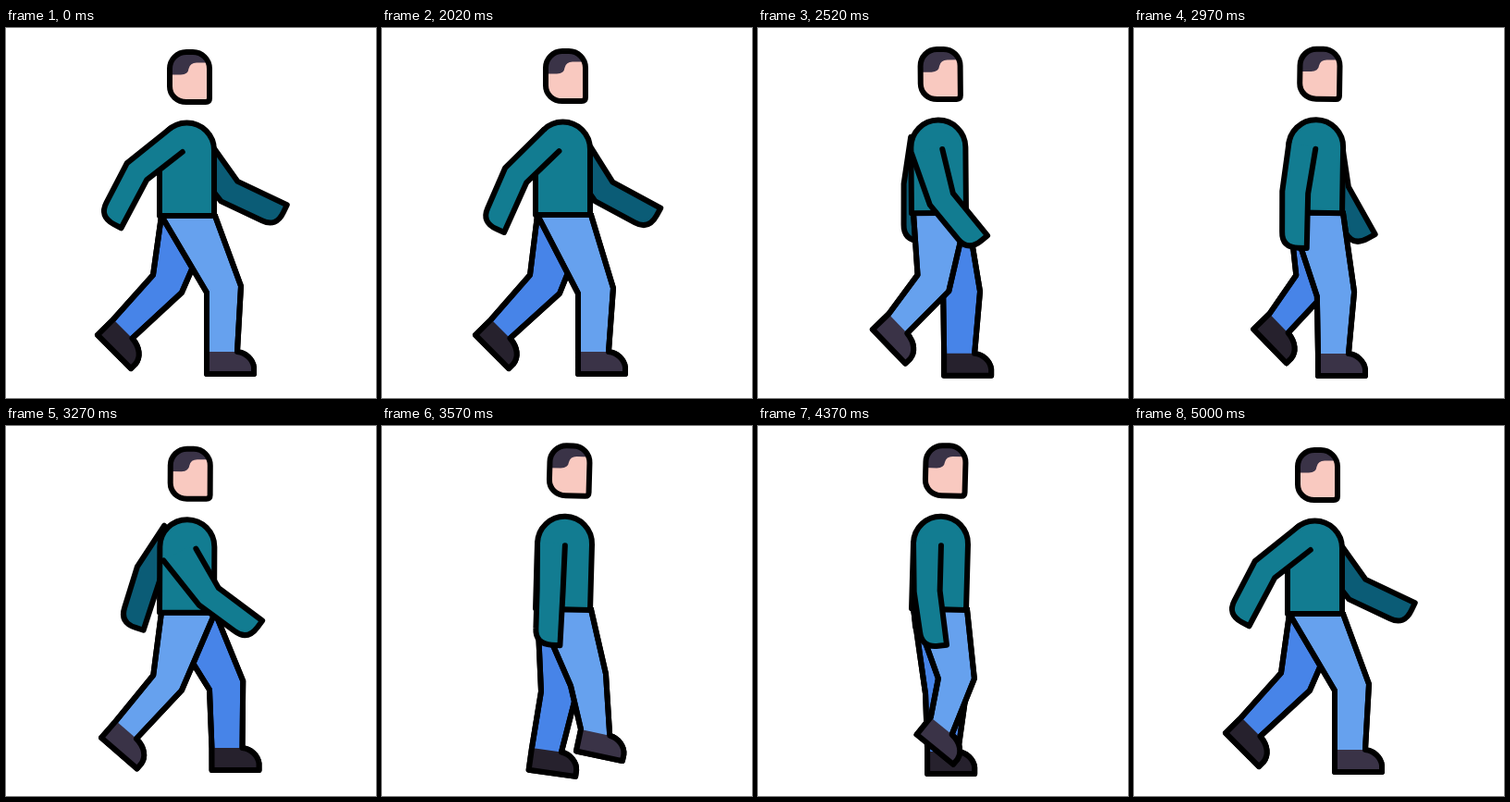
Recreate the animation shown at these times as an HTML page with a canvas. Size 400x400 px, loop 5020 ms.

```html
<!DOCTYPE html>
<html lang="en">
<head>
<meta charset="utf-8">
<title>Walking man</title>
<style>
html, body { margin: 0; width: 100%; height: 100%; overflow: hidden; background: #fff; }
canvas { display: block; width: 400px; height: 400px; }
</style>
</head>
<body>
<canvas id="stage"></canvas>
<script>
const LOOP = 5020, STEP = 17.5, LAST = 120;
const canvas = document.getElementById('stage');
const ctx = canvas.getContext('2d');
const dpr = window.devicePixelRatio || 1;
canvas.width = canvas.height = 400 * dpr;

// One walk cycle spans phase 0..2; each key starts with its phase.
// knee back x,y, knee front x,y, ankle back x,y, foot angle
const LEG = [
  [0, 217, 286, 254, 279, 217, 350, 0],
  [.057, 212, 287, 250, 281, 212, 350, 0],
  [.215, 199, 290, 239, 285, 200, 352, 0],
  [.43, 181, 290, 225, 288, 183, 352, 0],
  [.6, 172, 287, 210, 290, 162, 348, 8],
  [1, 159, 267, 190, 286, 116, 315, 45],
  [1.057, 160, 267, 192, 287, 118, 315, 45],
  [1.215, 174, 267, 208, 284, 144, 309, 46],
  [1.43, 195, 273, 234, 273, 187, 315, 39],
  [1.6, 204, 281, 242, 268, 215, 328, 12]
];
// upper arm angle, forearm angle, far shoulder x
const ARM = [
  [0, -36, -17, 195],
  [.215, -9.5, -1, 195],
  [.43, -4, 2, 198],
  [.6, 8, 15, 209],
  [1, 30, 56, 222],
  [1.215, 12, 37, 224],
  [1.43, 1, 9.3, 205],
  [1.6, -1, -1.5, 197]
];
const LEAN = [[0, 0], [.06, 0], [.229, .9], [.55, 1.4], [1, 0], [1.2, -.5], [1.43, 1.6], [1.6, 1.6]];

// Smooth cyclic curve through the keys
function sample(keys, phase) {
  const p = ((phase % 2) + 2) % 2, n = keys.length;
  const at = i => keys[((i % n) + n) % n];
  const time = i => at(i)[0] + 2 * Math.floor(i / n);
  let i = n - 1;
  while (keys[i][0] > p) i--;
  const h0 = time(i) - time(i - 1), h = time(i + 1) - time(i), h2 = time(i + 2) - time(i + 1);
  const s = (p - time(i)) / h;
  return at(i).slice(1).map((v, k) => {
    k++;
    const b = at(i + 1)[k];
    const d0 = (v - at(i - 1)[k]) / h0, d = (b - v) / h, d2 = (at(i + 2)[k] - b) / h2;
    const m = (d0 * h + d * h0) / (h0 + h), m2 = (d * h2 + d2 * h) / (h + h2);
    const r = 1 - s;
    return v * r * r * (1 + 2 * s) + b * s * s * (3 - 2 * s) + h * s * r * (m * r - m2 * s);
  });
}

const rad = a => a * Math.PI / 180;
const smooth = x => { x = Math.min(1, Math.max(0, x)); return x * x * (3 - 2 * x); };
const move = ([x, y], [dx, dy], k) => [x + dx * k, y + dy * k];

function fill(color) { ctx.fillStyle = color; ctx.fill(); }
function trace(points) { points.forEach(p => ctx.lineTo(p[0], p[1])); }

function drawLeg(phase, bob, cloth, shoe) {
  const [bx, by, fx, fy, ax, ay, turn] = sample(LEG, phase);
  const c = Math.cos(rad(turn)), s = Math.sin(rad(turn));
  const at = (x, y) => [ax + x * c - y * s, ay + x * s + y * c];
  const width = 33 - turn * .09;
  const foot = () => {
    trace([at(0, 0), at(0, 24), at(51, 24), at(51, 17)]);
    ctx.bezierCurveTo(...at(50, 8), ...at(42, 1), ...at(width, 0));
  };
  ctx.beginPath();
  trace([[168, 203 + bob], [bx, by]]);
  foot();
  trace([[fx, fy], [226, 203 + bob]]);
  ctx.closePath();
  fill(cloth);
  ctx.stroke();
  ctx.save();
  ctx.clip();
  ctx.beginPath();
  foot();
  ctx.closePath();
  fill(shoe);
  ctx.restore();
  ctx.beginPath();
  trace([[168, 203 + bob], [bx, by]]);
  foot();
  trace([[fx, fy], [226, 203 + bob]]);
  ctx.stroke();
}

function drawArm(shoulder, center, upper, fore, color) {
  const dir = a => [Math.sin(rad(a)), Math.cos(rad(a))];
  const back = a => [-Math.cos(rad(a)), Math.sin(rad(a))];
  const elbow = move(shoulder, dir(upper), 49);
  const tip = move(elbow, dir(fore), 59);
  const outer = move(elbow, back((upper + fore) / 2), 28);
  const corner = move(tip, back(fore), 27);
  const top = move(center, back(upper), 29.5);
  const path = () => {
    ctx.beginPath();
    trace([shoulder, elbow, tip, move(tip, back(fore), 9)]);
    ctx.quadraticCurveTo(...corner, ...move(corner, dir(fore), -17));
    trace([outer, top]);
  };
  path();
  ctx.lineTo(...center);
  ctx.closePath();
  fill(color);
  path();
  ctx.stroke();
}

function drawTorso() {
  ctx.beginPath();
  ctx.moveTo(166, 203);
  ctx.arc(195.5, 132, 29.5, Math.PI, 0);
  ctx.lineTo(225, 203);
  ctx.closePath();
  fill('#127c91');
  ctx.stroke();
}

function drawHead() {
  const path = () => {
    ctx.beginPath();
    ctx.moveTo(177, 44);
    ctx.bezierCurveTo(177, 34, 185, 26, 195, 26);
    ctx.lineTo(202, 26);
    ctx.bezierCurveTo(212, 26, 220, 34, 220, 44);
    ctx.lineTo(220, 76);
    ctx.quadraticCurveTo(220, 80, 216, 80);
    ctx.lineTo(195, 80);
    ctx.bezierCurveTo(185, 80, 177, 73, 177, 63);
    ctx.closePath();
  };
  path();
  fill('#f9c9c0');
  ctx.save();
  ctx.clip();
  ctx.beginPath();
  trace([[174, 20], [174, 50.5], [189, 50.5]]);
  ctx.quadraticCurveTo(197, 50, 197.5, 44);
  ctx.quadraticCurveTo(199, 37.5, 206, 37.5);
  trace([[224, 37.5], [224, 20]]);
  fill('#3a3347');
  ctx.restore();
  path();
  ctx.stroke();
}

function upperBody(lean, bob, draw) {
  ctx.save();
  ctx.translate(196, 204 + bob);
  ctx.rotate(rad(lean));
  ctx.translate(-196, -204);
  draw();
  ctx.restore();
}

// Steady pace, then a soft stop at six steps
function walkPhase(n) {
  if (n <= 95) return n / STEP;
  return 6 - (6 - 95 / STEP) * Math.pow((LAST - n) / 25, 2.5);
}

function draw(ms) {
  const n = Math.min(LAST, Math.max(0, Math.floor((ms % LOOP - 1995) / 25)));
  const phase = walkPhase(n);
  const rest = 1 - smooth(n / 8) + smooth((n - 92) / 20);
  const bob = -5 * Math.abs(Math.sin(Math.PI * phase));
  const lean = sample(LEAN, phase)[0];
  const [nearUp, nearFore] = sample(ARM, phase);
  const [farUp, farFore, farX] = sample(ARM, phase + 1);
  const damp = a => a > 0 ? a * .85 : a;

  ctx.setTransform(dpr, 0, 0, dpr, 0, 0);
  ctx.fillStyle = '#fff';
  ctx.fillRect(0, 0, 400, 400);
  ctx.lineWidth = 6;
  ctx.lineJoin = ctx.lineCap = 'round';
  ctx.strokeStyle = '#000';

  upperBody(lean, bob, () => {
    const s = [farX, 126];
    drawArm(s, s, damp(farUp) + 10 * rest, damp(farFore) + 17 * rest, '#0b5c76');
  });
  drawLeg(phase + 1, bob, '#4784e8', '#26212d');
  drawLeg(phase, bob, '#66a1ee', '#3a3347');
  upperBody(lean, bob, () => {
    const up = nearUp - 16 * rest;
    const x = 196 + up * (up > 0 ? .3 : .1);
    drawTorso();
    drawArm([x, 134], [195.5, 132], up, nearFore - 11 * rest, '#127c91');
    drawHead();
  });
}

const start = performance.now();
function tick() {
  draw(performance.now() - start);
  requestAnimationFrame(tick);
}
tick();
</script>
</body>
</html>
```
